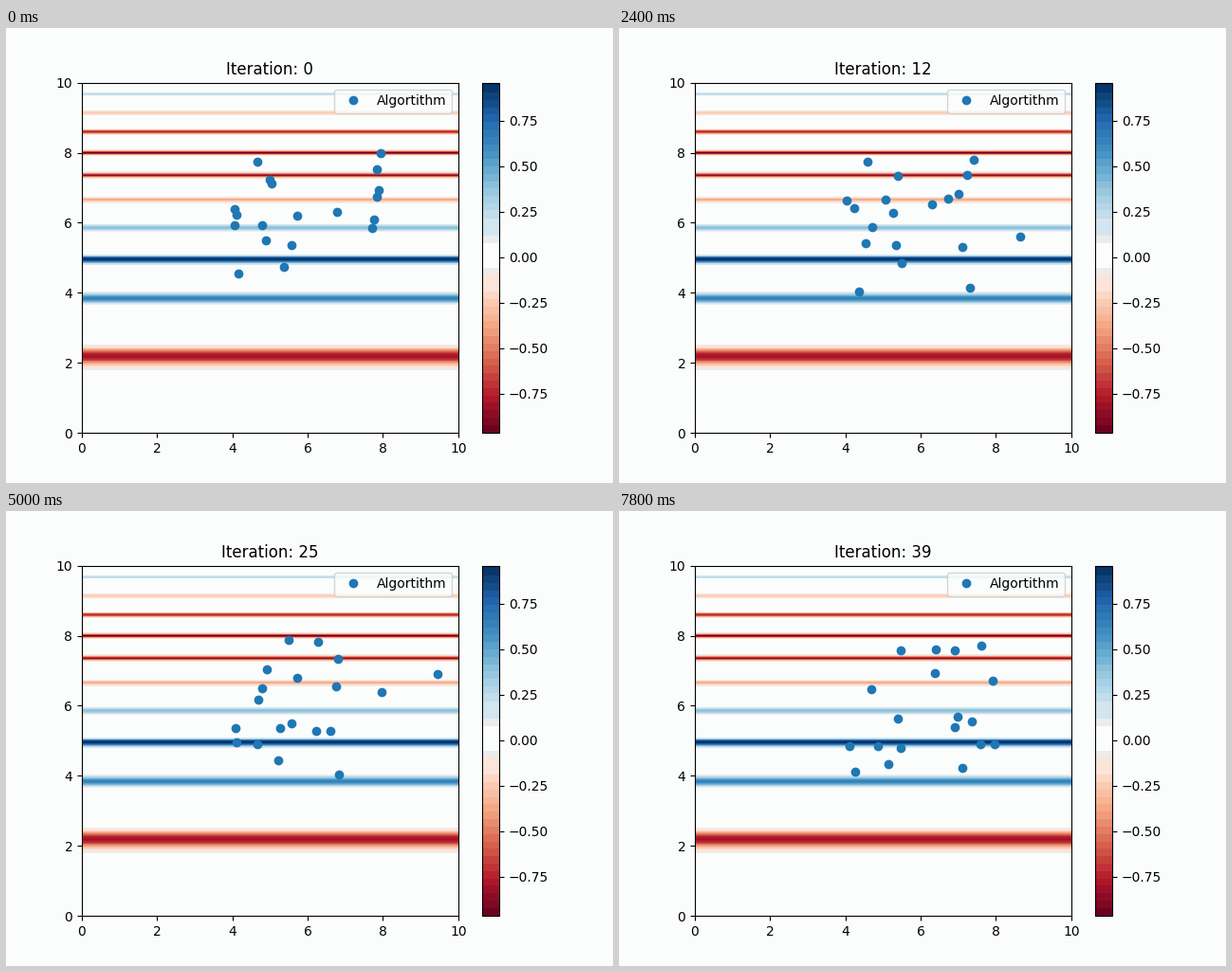
Write a matplotlib script that moves like this. It is 640x480 px and loops after 8 s.

```python
import numpy as np
import matplotlib.pyplot as plt
from matplotlib.animation import FuncAnimation
from matplotlib.colors import ListedColormap, to_rgba

STEPS, STEP_MS = 40, 200
LOW, HIGH = 4, 8                # search box of the swarm
STRIDE = 0.5                    # typical move per step
LEAP_CHANCE = 0.04              # a particle leaves the box for one step
PAPER = "#fbfdfc"

# where the swarm starts
START = np.array([
    (4.67, 7.73), (4.98, 7.22), (5.05, 7.13), (4.07, 6.38), (4.10, 6.24),
    (4.07, 5.92), (4.80, 5.92), (4.88, 5.51), (5.58, 5.35), (5.38, 4.75),
    (4.15, 4.54), (5.71, 6.19), (6.77, 6.30), (7.95, 8.00), (7.83, 7.54),
    (7.90, 6.92), (7.83, 6.73), (7.77, 6.08), (7.70, 5.84)])


def landscape(y):
    return -np.sin(y) * np.sin(y ** 2 / np.pi) ** 20


def banded_map(width=5.4):
    """RdBu in flat bands that fade to paper around zero."""
    idx = np.arange(256)
    mid = (np.floor(idx / width) + 0.5) * width
    rgba = plt.get_cmap("RdBu")(np.clip(mid / 255, 0, 1))
    off = np.abs(idx - 129.5)
    rgba[off < 27] = to_rgba("#d3e5ef")
    rgba[(off < 27) & (idx < 128)] = to_rgba("#fbe4d9")
    rgba[off < 14] = to_rgba("#ececec")
    rgba[off < 9] = to_rgba(PAPER)
    return ListedColormap(rgba)


def fold(p):
    """Bounce positions back into the search box."""
    span = HIGH - LOW
    return HIGH - np.abs((p - LOW) % (2 * span) - span)


def swarm_path():
    rng = np.random.default_rng(7)
    path = [START]
    pos = START
    for _ in range(STEPS - 1):
        pos = fold(pos + rng.normal(0, STRIDE, pos.shape))
        leap = rng.random(len(pos)) < LEAP_CHANCE
        far = rng.uniform((2, 2), (9.6, 8.2), pos.shape)
        path.append(np.where(leap[:, None], far, pos))
    return path


path = swarm_path()

fig, ax = plt.subplots(figsize=(6.4, 4.8), dpi=100, facecolor=PAPER)
ys = np.linspace(0, 10, 401)
field = np.repeat(landscape(ys[1:])[:, None], 2, axis=1)
mesh = ax.pcolormesh([0, 5, 10], ys, field, cmap=banded_map())
fig.colorbar(mesh, ax=ax)

dots, = ax.plot([], [], "o", color="#1f77b4", label="Algortithm")
ax.set(xlim=(0, 10), ylim=(0, 10))
ax.legend(loc="upper right", facecolor=PAPER)
title = ax.set_title("Iteration: 0")


def update(step):
    dots.set_data(*path[step].T)
    title.set_text(f"Iteration: {step}")
    return dots, title


anim = FuncAnimation(fig, update, frames=STEPS, interval=STEP_MS,
                     repeat=True, repeat_delay=0)
plt.show()
```
